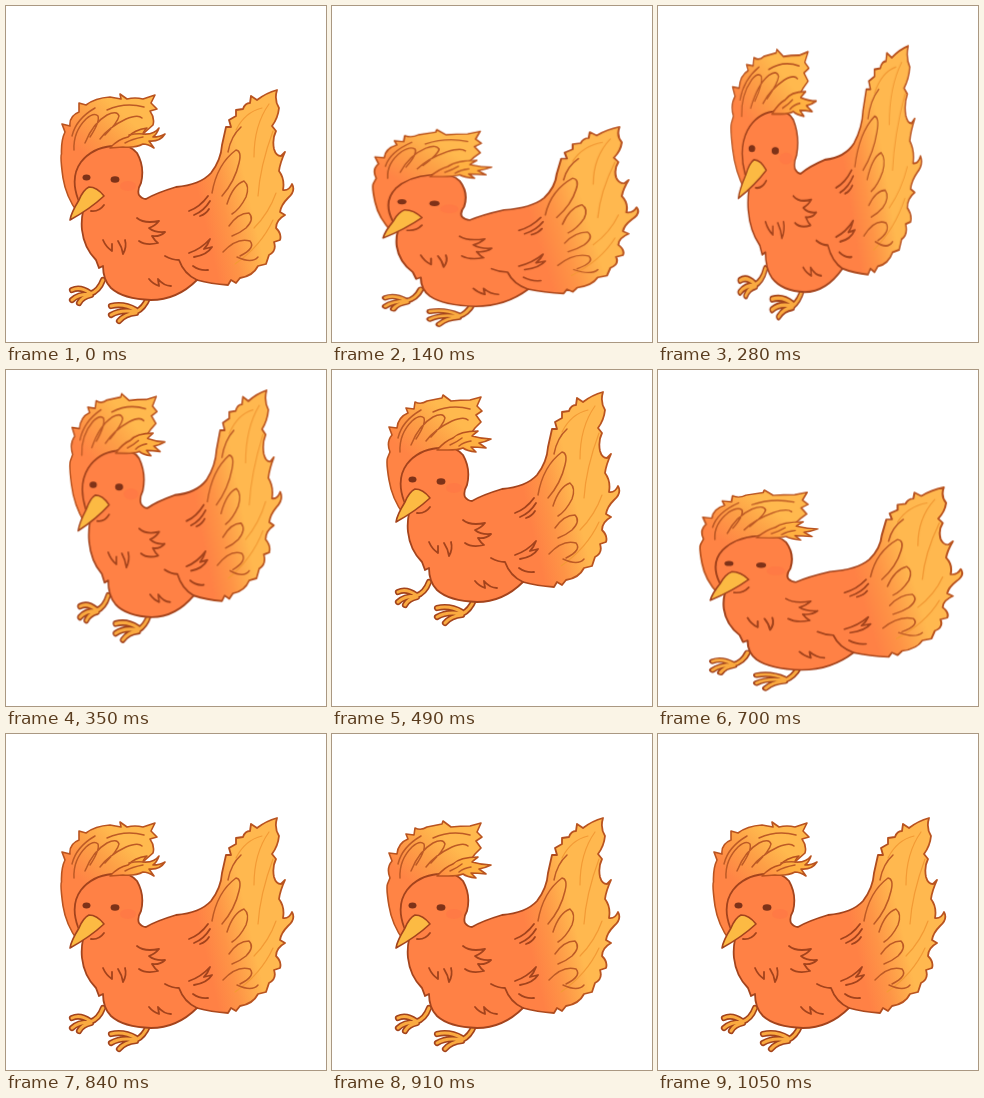
These frames come from a looping animation (320 by 336 pixels, 1.12 s). An HTML page:

```html
<!DOCTYPE html>
<html lang="en">
<head>
<meta charset="utf-8">
<title>Hopping firebird</title>
<style>
  html, body { margin: 0; width: 100%; height: 100%; overflow: hidden; background: #fff; }
  svg { display: block; width: 320px; height: 336px; }
  path { stroke-linecap: round; stroke-linejoin: round; }
  .ink { fill: none; stroke: #a3431c; stroke-width: 1.8; }
  .vein { fill: none; stroke: #bd5a25; stroke-width: 1.5; }
  .glow { fill: none; stroke: #f39a35; stroke-width: 1.2; }
  .flame { stroke: #b9531f; stroke-width: 1.6; }
  .beak { fill: #fcba43; stroke: #a3431c; stroke-width: 1.6; }
  .claw { fill: none; stroke: #a3431c; stroke-width: 6.2; }
  .claw + .claw { stroke: #faaa40; stroke-width: 3; }

  #bird, .calm, .wild { animation: 1120ms step-end infinite; }
  #bird { transform-origin: 155px 317px; animation-name: hop; }
  .calm { animation-name: calm; }
  .wild { animation-name: wild; transform-origin: 100px 145px; }

  /* crouch, spring, fly, land; one pose per sixteenth */
  @keyframes hop {
    0%     { transform: none; }
    6.25%  { transform: translateY(1.5px) scale(1.07, .93); }
    12.5%  { transform: translateY(3px) scale(1.142, .854); }
    18.75% { transform: translateY(0) scale(.98, 1.01); }
    25%    { transform: translateY(-4px) scale(.82, 1.172); }
    31.25% { transform: translateY(-45px) scale(.91, 1.08); }
    37.5%  { transform: translateY(-70px); }
    43.75% { transform: translateY(-62px); }
    50%    { transform: translateY(-45px); }
    56.25% { transform: translateY(-17px); }
    62.5%  { transform: translateY(3px) scale(1.128, .87); }
    68.75% { transform: translateY(1.5px) scale(1.06, .94); }
    75%, 100% { transform: none; }
  }
  /* two flame drawings take turns */
  @keyframes calm {
    0%, 18.75%, 37.5%, 75%, 93.75% { visibility: visible; }
    6.25%, 25%, 43.75%, 81.25% { visibility: hidden; }
    100% { visibility: visible; }
  }
  @keyframes wild {
    0%, 18.75%, 37.5%, 75%, 93.75%, 100% { visibility: hidden; transform: none; }
    6.25%, 31.25%, 50%, 62.5%, 87.5% { visibility: visible; transform: rotate(.8deg); }
    12.5%, 25%, 43.75%, 56.25%, 68.75%, 81.25% { visibility: visible; transform: none; }
  }
</style>
</head>
<body>
<svg viewBox="0 0 320 336">
  <defs>
    <linearGradient id="far" gradientUnits="userSpaceOnUse" x1="74" y1="145" x2="112" y2="103">
      <stop offset="0" stop-color="#ff8445"/>
      <stop offset=".55" stop-color="#fd9f46"/>
      <stop offset="1" stop-color="#ffb94e"/>
    </linearGradient>
    <linearGradient id="near" gradientUnits="userSpaceOnUse" x1="195" y1="200" x2="243" y2="189">
      <stop offset="0" stop-color="#ff8145"/>
      <stop offset=".45" stop-color="#fe9446"/>
      <stop offset="1" stop-color="#ffb84f"/>
    </linearGradient>
    <linearGradient id="edge" gradientUnits="userSpaceOnUse" x1="190" y1="0" x2="245" y2="0">
      <stop offset="0" stop-color="#a3431c"/>
      <stop offset="1" stop-color="#b9531f"/>
    </linearGradient>
    <linearGradient id="crest" gradientUnits="userSpaceOnUse" x1="106" y1="142" x2="132" y2="130">
      <stop offset="0" stop-color="#ff8a43"/>
      <stop offset="1" stop-color="#ffb142"/>
    </linearGradient>
    <path id="steps" d="M97 274Q93 285 84 288M84 287Q74 280 66 284M84 288Q72 288 66 294M85 289Q76 291 73 297M142 292Q138 302 130 306M130 304Q118 297 105 300M130 306Q115 303 105 309M130 307Q119 308 113 315"/>
  </defs>

  <g id="bird">
    <!-- far wing -->
    <g class="calm">
      <path class="flame" fill="url(#far)" d="M72 207Q60 191 57 172Q54 150 55.500 148Q55 134 59 126L56 118L64 120Q63 110 73 106L73 97L80 99Q89 92 104 91L115 93L114 88L121 93Q129 91 137 93L149 89L145 97L151 103L144 105Q149 112 147 119L138 127L118 145L90 170Z"/>
    </g>
    <g class="wild">
      <path class="flame" fill="url(#far)" d="M72 207Q60 191 57 172Q54 154 55.500 150L58 144Q54 134 60 127L57 119L65 120Q66 109 76 105L74 100L82 101L83 94Q89 97 95 93L110 90L111 87L119 93Q128 92 138 92L149 89L145 98L150 103L144 107L149 114L143 120L137 128L118 145L90 170Z"/>
    </g>
    <path class="vein" d="M68 144Q67 126 80 113Q88 106 92 110Q94 116 84 131M79 137Q87 117 101 109Q111 104 113 110Q112 116 99 129M94 133Q103 121 120 113Q132 108 136 112M66 130Q70 113 89 102M101 104Q119 96 138 101"/>

    <!-- feet -->
    <use href="#steps" class="claw"/>
    <use href="#steps" class="claw"/>

    <!-- body with near wing -->
    <path fill="url(#near)" stroke="url(#edge)" stroke-width="1.8" d="M106 140Q123 137 131 147Q139 161 135 177Q131 184 133 189Q136 193 140 193Q150 187 170 181Q194 179 205 167Q215 154 216 139L220 121L225 121L223 114L230 110L230 104L237 103Q239 97 244 97L245 90L251 94Q260 87 271 84Q268 94 273 102Q272 112 266 120L270 125Q266 133 268 143Q270 150 275 150L279 146Q274 157 273 165Q279 173 277 184Q283 185 286 178Q290 185 282 192Q275 199 274 206L279 209Q270 214 270 222Q276 228 274 234L268 236Q271 245 263 249L260 258L252 260Q247 270 234 272L230 277L225 274L222 279Q205 278 191 274Q171 294 145 294Q117 293 105 282Q97 274 97 260L93 262L90 254Q78 242 76 224Q75 215 77 205L72 193Q64 171 75 156Q86 142 106 140Z"/>
    <ellipse cx="122" cy="180" rx="8" ry="5" fill="#ff7045" opacity=".4"/>

    <!-- near wing feathers -->
    <path class="glow" d="M263 98Q248 119 248 151M267 125Q254 160 252 190M270 187Q263 207 248 222M267 214Q255 240 229 258M230 124Q239 106 256 102"/>
    <path class="vein" d="M206 187Q211 158 230 144Q236 145 233 157Q229 175 216 190M221 198Q227 179 238 175Q244 180 240 191Q234 203 226 208M223 220Q232 207 243 207Q249 213 240 222Q234 227 226 230M217 246Q231 231 244 235Q250 242 234 250M231 251Q246 258 252 251M222 146Q225 130 235 121"/>

    <!-- plumage marks -->
    <path class="ink" d="M97 234Q100 241 106 245L106 238M112 235Q116 241 117 248Q121 241 119 234M131 212Q138 218 153 215Q149 220 143 222Q149 227 159 226Q154 231 146 230Q149 235 152 237Q140 240 133 235M183 205Q194 201 202 190M188 209Q198 205 204 195M194 210Q200 208 203 203M183 247Q195 243 204 233Q202 239 198 243L206 241Q201 249 188 251M187 260Q194 265 202 264M159 250Q166 254 173 254Q178 268 191 274M143 273Q147 278 153 280L152 273Q158 280 165 280"/>

    <!-- face -->
    <ellipse cx="80.500" cy="171.500" rx="4" ry="3" fill="#7e3218"/>
    <ellipse cx="109" cy="173.500" rx="4.400" ry="3.200" fill="#7e3218"/>
    <path class="ink" d="M85 205Q93 206 98 199"/>
    <path class="beak" d="M83 181Q91 181 98 190Q84 203 64 214Q65 207 73 194Q77 184 83 181Z"/>

    <!-- crest -->
    <g class="calm">
      <path class="flame" fill="url(#crest)" d="M104 142Q112 133 122 131Q128 124 141 122Q137 126 137 128Q148 129 153 122Q151 128 147 131Q154 131 159 128Q154 136 143 135L148 142Q142 138 137 138Q130 142 117 141Z"/>
      <path class="vein" d="M119 137Q126 133 137 131M123 129Q131 127 138 128"/>
    </g>
    <g class="wild">
      <path class="flame" fill="url(#crest)" d="M105 142Q113 133 121 130Q128 123 146 123Q142 126 140 128Q150 131 159 131Q153 134 147 135L154 140Q145 139 139 139L144 144Q135 143 131 140Q126 142 116 142Z"/>
      <path class="vein" d="M118 137Q125 134 130 130M127 138Q132 134 139 133"/>
    </g>
  </g>
</svg>
</body>
</html>
```
